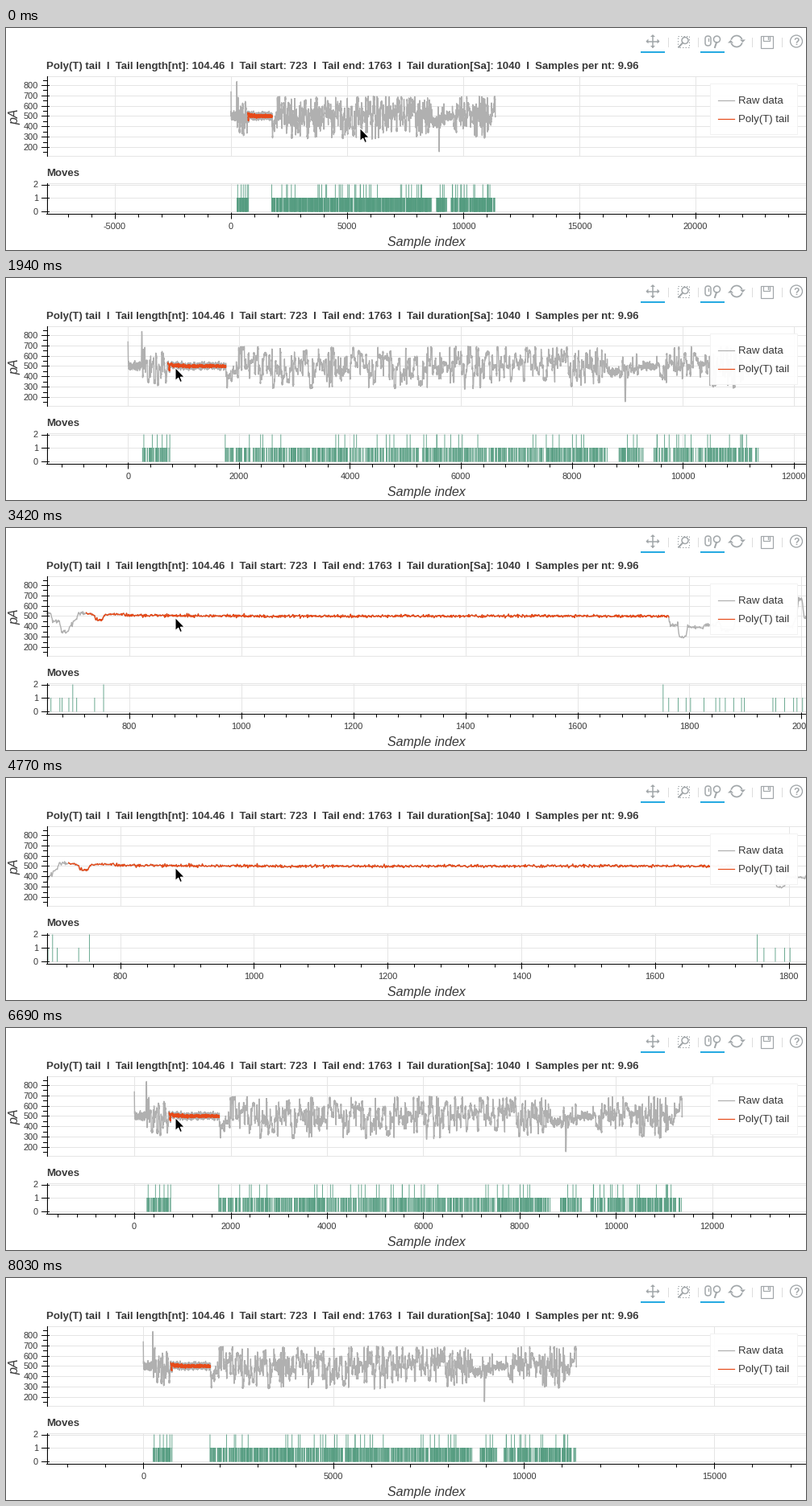
These frames come from a looping animation (992 by 276 pixels, 9.23 s). A matplotlib script:

```python
import numpy as np
import matplotlib.pyplot as plt
from matplotlib.animation import FuncAnimation
from matplotlib.collections import LineCollection
from matplotlib.patches import Arc, Circle, FancyBboxPatch, Polygon, Rectangle

W, H, DPI = 992, 276, 100
PX = 72 / DPI
LOOP, INTERVAL = 9230, 65
LEFT, RIGHT = 50, 992
TOP, BOTTOM = (60, 159), (193, 231)
GREY, RED, GREEN = "#b0b0b0", "#e64a19", "#549c80"
TEXT, GRID, ICON, BLUE = "#383838", "#e5e5e5", "#a1a6a9", "#26aae1"
TAIL = (723, 1763)
N = 11380

plt.rcParams["font.family"] = "Liberation Sans"
fig = plt.figure(figsize=(W / DPI, H / DPI), dpi=DPI, facecolor="white")
ax = fig.add_axes([0, 0, 1, 1])
ax.set(xlim=(0, W), ylim=(H, 0))
ax.axis("off")


def stroke(xs, ys, color=ICON, lw=1.0, z=5):
    return ax.plot(xs, ys, color=color, lw=lw * PX, zorder=z)[0]


def label(x, y, s, size, ha="left", **kw):
    return ax.text(x, y, s, fontsize=size * PX, color=kw.pop("color", TEXT), ha=ha,
                   va=kw.pop("va", "baseline"), zorder=8, **kw)


def outline(shape, width):
    shape.set(fill=False, edgecolor=ICON, linewidth=width * PX, zorder=5)
    ax.add_patch(shape)


def segments(color, z, lw=1.0):
    coll = LineCollection([], colors=color, linewidths=lw * PX, zorder=z)
    ax.add_collection(coll, autolim=False)
    return coll


def current_y(v):
    return 71 + (800 - v) * 0.1283


def move_y(v):
    return 227.5 - 16.5 * v


# ---------- data ----------
rng = np.random.default_rng(7)
t = np.arange(N)
in_tail = (t >= TAIL[0]) & (t <= TAIL[1])
BURSTS = [(262, 760, 1), (1753, 8640, 1), (8850, 9290, 0.6), (9480, 11375, 1)]


def random_moves(start, stop):
    pos = start + np.cumsum(4 + rng.exponential(9, (stop - start) // 5))
    return np.append(start, pos[pos < stop].round())


def bump(center, width, height):
    return height * np.exp(-((t - center) / width) ** 4)


def make_signal():
    levels = [0]
    for _ in moves:
        levels.append(0.25 * levels[-1] + rng.normal(0, 92))
    gain = sum(g * ((t >= a) & (t < b)) for a, b, g in BURSTS)
    y = gain * np.array(levels)[np.searchsorted(moves, t)]
    y = np.convolve(y, np.ones(4) / 4, "same")
    y = np.clip(500 + y, 300, 670) + bump(8745, 120, -60)
    y += rng.normal(0, 1, N) * np.where(gain > 0, 9, 17)
    # start-up decay, adapter spike and a few deep drops
    y += 235 * np.exp(-t / 4)
    for center, width, target in ((250, 7, 835), (6070, 10, 275), (8962, 10, 155),
                                  (10910, 8, 285)):
        mix = bump(center, width, 1)
        y = y * (1 - mix) + target * mix
    settle = 500 + 25 * np.exp(-(t - TAIL[0]) / 80.0) + bump(746, 8, -60)
    return np.where(in_tail, settle + rng.normal(0, 7, N), y)


moves = np.concatenate([random_moves(a, b) for a, b, _ in BURSTS])
heights = np.where(rng.random(len(moves)) < 0.08, 2, 1)
raw = make_signal()
# Dense strokes overshoot the tail when zoomed out.
fringe = np.where(in_tail, rng.normal(0, 15, N), 0)

# ---------- view timeline ----------
HOME, FIRST, REST = np.array([(439, 124.5), (369, 111.5), (210, 111.5)])
ZOOM_A, ZOOM_B = (371, 3194), (212, 885)  # (pixel, sample) kept fixed
timeline = []


def run(start, stop, count, progress, scales, anchor=ZOOM_B, path=(REST, REST), delay=0.0):
    """Zoom through the key scales in equal steps while the pointer follows its path."""
    for k, now in enumerate(np.linspace(start, stop, count), 1):
        p = k / count
        scale = np.exp(np.interp(p, progress, np.log(scales)))
        q = max(0, (p - delay) / (1 - delay))
        pointer = None if path is None else path[0] + (path[1] - path[0]) * q
        timeline.append((now, scale, anchor, pointer))


WHOLE = (0, 1)
run(0, 0, 1, WHOLE, (0.0288, 0.0288), ZOOM_A, (HOME, HOME))
run(600, 750, 2, WHOLE, (0.0288, 0.0288), ZOOM_A, (HOME, FIRST))
run(1190, 1940, 6, (0, 0.66, 1), (0.0288, 0.0688, 0.0688), ZOOM_A, (FIRST, REST), 0.66)
run(2380, 3420, 8, (0, 0.7, 1), (0.0688, 0.52, 0.6945))
run(4170, 5210, 8, (0, 0.35, 0.625, 1), (0.6945, 1.2, 0.829, 0.205))
run(5800, 6840, 8, (0, 0.375, 0.875, 1), (0.205, 0.1206, 0.0597, 0.0555))
run(6990, 7730, 6, WHOLE, (0.0555, 0.0472))
run(8030, 8030, 1, WHOLE, (0.0472, 0.0472), path=None)
step_times = np.array([step[0] for step in timeline])

# ---------- static plot parts ----------
clips = {}
for span in (TOP, BOTTOM):
    box = (LEFT, span[0]), RIGHT - LEFT, span[1] - span[0]
    ax.add_patch(Rectangle(*box, fill=False, ec=GRID, lw=PX, zorder=1))
    clips[span] = ax.add_patch(Rectangle(*box, fc="none", ec="none"))
    stroke([LEFT + 0.5] * 2, span, "black", z=6)
stroke([LEFT, RIGHT], [BOTTOM[1] - 0.5] * 2, "black", z=6)


def y_axis(values, to_px):
    for v in values:
        y = to_px(v)
        stroke([LEFT, RIGHT], [y, y], GRID, z=1)
        stroke([44, 52.5], [y, y], "black", z=6)
        label(40, y + 4, str(v), 11, "right")


y_axis(range(200, 801, 100), current_y)
y_axis(range(3), move_y)
for v in range(150, 851, 100):
    stroke([46, 50.5], [current_y(v)] * 2, "black", z=6)

facts = ["Poly(T) tail", "Tail length[nt]: 104.46", "Tail start: 723", "Tail end: 1763",
         "Tail duration[Sa]: 1040", "Samples per nt: 9.96"]
label(50, 51, "  I  ".join(facts), 13.28, weight="bold")
label(50, 184.5, "Moves", 13.28, weight="bold")
label(521.5, 270.5, "Sample index", 16, "center", style="italic")
label(11, 110, "pA", 16, "center", va="center", style="italic", rotation=90)

ax.add_patch(Rectangle((873, 69), 108, 63, fc="white", ec="#f2f2f2", lw=PX, alpha=0.96,
                       zorder=5))
for y, color, name in ((89.5, GREY, "Raw data"), (112.5, RED, "Poly(T) tail")):
    stroke([883, 903], [y, y], color, 1.2, 6)
    label(908, y + 4.5, name, 13.2)


# ---------- toolbar ----------
def arrow_head(x, y, dx, dy, size=3):
    pts = [(x, y), (x - size * (dx + dy), y - size * (dy + dx)),
           (x - size * (dx - dy), y - size * (dy - dx))]
    ax.add_patch(Polygon(pts, fc=ICON, ec="none", zorder=5))


def toolbar():
    for x in (820.5, 857.5, 924.5, 961.5):
        stroke([x, x], [12, 23], "#dddddd")
    for x in (787, 861):
        ax.add_patch(Rectangle((x, 29), 30, 2, fc=BLUE, ec="none", zorder=5))
    # pan
    stroke([795, 809], [16.5, 16.5], lw=1.5)
    stroke([802, 802], [9.5, 23.5], lw=1.5)
    for dx, dy in ((1, 0), (-1, 0), (0, 1), (0, -1)):
        arrow_head(802 + 8.5 * dx, 16.5 + 8.5 * dy, dx, dy)
    # box zoom
    outline(Rectangle((832.5, 9.5), 14, 14, ls=(0, (1.5, 2))), 1)
    outline(Circle((842, 15.5), 4), 1.5)
    stroke([839, 834.5], [18.5, 23.5], lw=2)
    # wheel zoom
    outline(FancyBboxPatch((867, 10), 7, 12, boxstyle="round,pad=0,rounding_size=3.4"), 1.5)
    stroke([870.5, 870.5], [12.5, 16], lw=1.3)
    outline(Circle((881.5, 14), 4), 1.5)
    stroke([881, 879], [18, 24], lw=2)
    # reset
    for a, b in ((195, 340), (15, 160)):
        outline(Arc((906, 16.5), 14, 14, theta1=a, theta2=b), 1.7)
    arrow_head(913.5, 18, 0, 1, 3.5)
    arrow_head(898.5, 15, 0, -1, 3.5)
    # save
    outline(Rectangle((935.5, 9.5), 15, 15), 1.2)
    stroke([939, 939, 947, 947], [10, 15.5, 15.5, 10], lw=1.1)
    stroke([944.5, 944.5], [11, 14], lw=1.3)
    # help
    outline(Circle((980, 16.5), 7.5), 1.3)
    label(980, 21, "?", 12, "center", color=ICON, weight="bold")


toolbar()

# ---------- moving parts ----------
grid = segments(GRID, 1)
bars = segments(GREEN, 3, 0.85)
bars.set_snap(False)
x_ticks = segments("black", 6)
raw_line = stroke([], [], GREY, 1.4, 3)
tail_line = stroke([], [], RED, 1.4, 4)
bars.set_clip_path(clips[BOTTOM])
for line in (raw_line, tail_line):
    line.set_clip_path(clips[TOP])
tick_labels = [label(0, 250.5, "", 11, "center") for _ in range(14)]
ARROW = np.array([(0, 0), (0, 16), (3.7, 12.6), (6, 18), (8.4, 17), (6.2, 11.7), (11.3, 11.7)])
cursor = ax.add_patch(Polygon(ARROW, fc="black", ec="white", lw=PX, zorder=10))


def tick_step(span):
    steps = [m * 10 ** e for e in range(1, 5) for m in (1, 2, 5)]
    return min(steps, key=lambda s: abs(6 - span / s))


def multiples(step, lo, hi):
    return np.arange(np.ceil(lo / step), np.floor(hi / step) + 1) * step


def update(i):
    now = (i + 1) * INTERVAL
    _, scale, (px, sample), pointer = timeline[np.searchsorted(step_times, now, "right") - 1]

    def to_px(x):
        return px + scale * (x - sample)

    lo, hi = (sample + (edge - px) / scale for edge in (LEFT, RIGHT))
    step = tick_step(hi - lo)
    major = multiples(step, lo, hi)
    minor = multiples(step / 5, lo, hi)
    grid.set_segments([[(x, a), (x, b)] for x in to_px(major) for a, b in (TOP, BOTTOM)])
    x_ticks.set_segments([[(x, 229), (x, 237)] for x in to_px(major)]
                         + [[(x, 231), (x, 235)] for x in to_px(minor)])
    for text in tick_labels:
        text.set_text("")
    for text, value in zip(tick_labels, major):
        text.set_text(str(int(value)))
        text.set_x(to_px(value))

    seen = (t > lo - 20) & (t < hi + 20)
    values = raw + fringe * (scale < 0.3)
    raw_line.set_data(to_px(t[seen]), current_y(values[seen]))
    both = seen & in_tail
    tail_line.set_data(to_px(t[both]), current_y(raw[both]))
    shown = (moves > lo) & (moves < hi)
    bars.set_segments([[(x, move_y(0) + 1), (x, move_y(h))]
                       for x, h in zip(to_px(moves[shown]), heights[shown])])

    cursor.set_visible(pointer is not None)
    if pointer is not None:
        cursor.set_xy(ARROW + pointer)
    return []


anim = FuncAnimation(fig, update, frames=LOOP // INTERVAL, interval=INTERVAL,
                     init_func=lambda: update(0), repeat=True, repeat_delay=0)
plt.show()
```
